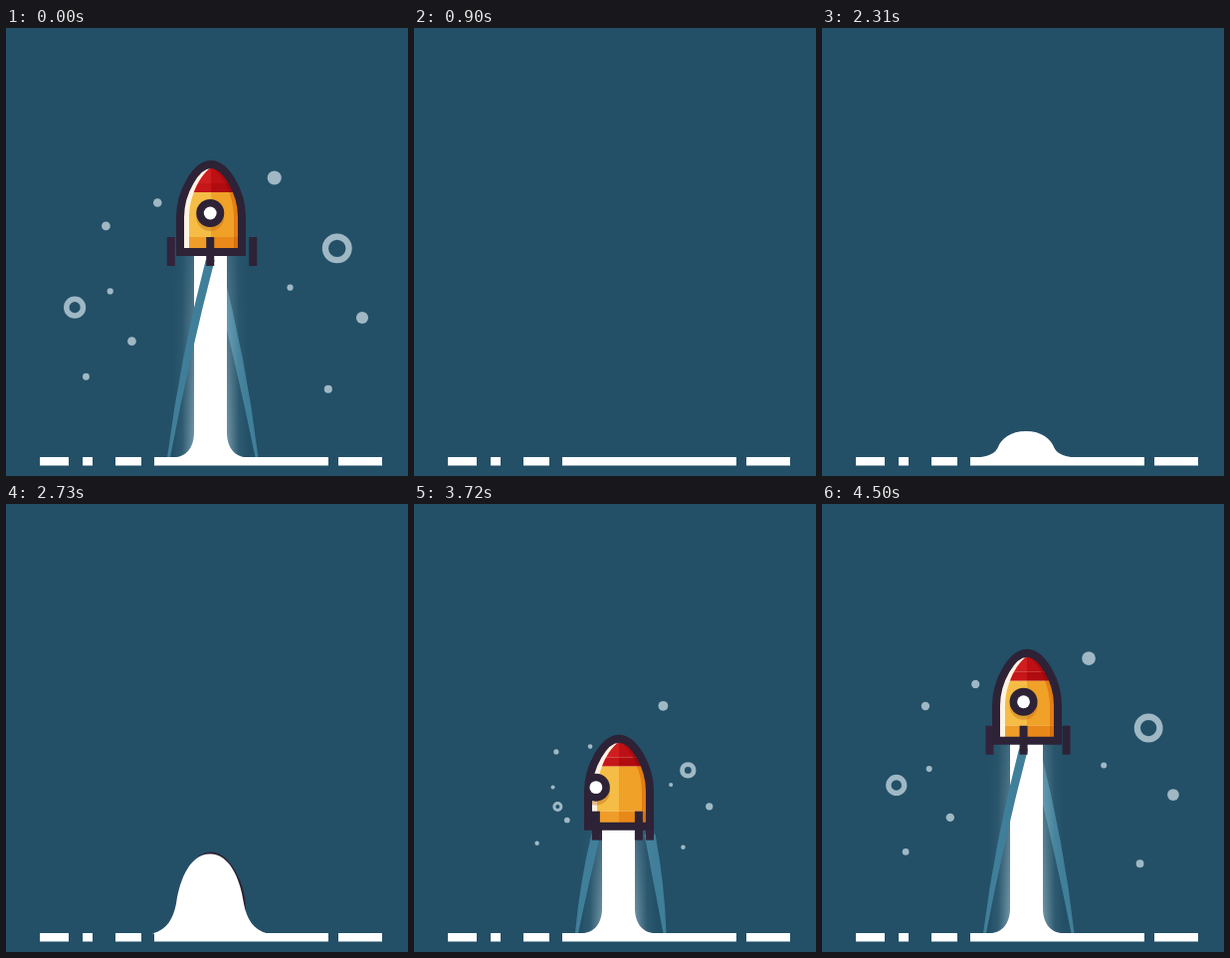
Write an HTML page with a canvas that moves like this. It is 404 px wide and 450 px high and loops after 4.53 s.

```html
<!DOCTYPE html>
<html>
<head>
<meta charset="utf-8">
<style>
html, body { margin: 0; width: 100%; height: 100%; overflow: hidden; background: #235067; }
canvas { display: block; }
</style>
</head>
<body>
<canvas id="stage" width="404" height="450"></canvas>
<script>
const ctx = document.getElementById('stage').getContext('2d');
const LOOP = 4530, STEP = 30, WRAP = 1200;
const CX = 206, GROUND = 431, BLAST_Y = 323;
const LAUNCH = 2730, RELEASE = .6;
const BG = '#235067', INK = '#2d2236', INK_BACK = '#33233a';
const TRAIL = '#407f99', DUST = '#9fb8c4';

const clamp = (v, a = 0, b = 1) => Math.min(b, Math.max(a, v));
const mix = (a, b, k) => a + (b - a) * k;
const softplus = (x, w) => w * Math.log(1 + Math.exp(x / w));

// Flight progress: slow motion that speeds up around 4300 ms.
const progress = t => .00012 * (t - 3150) + .00184 * softplus(t - 4300, 90);
const speedUp = (p, k) => mix(p, p ** 3, k);

const rocketTop = (t, p) =>
  242 - 236 * speedUp(p, .363) + 200 / (1 + Math.exp((t - LAUNCH) / 30));
const spin = p => -.62 + 1.15 * speedUp(p, .255);

// Where each speck flies to, its size there, and how far out it already is
// in slow motion; rings also have a hole.
const dust = [
  [281, 120, 8.3, .55],
  [77.5, 172, 5.3, .43],
  [139.5, 140.5, 5.3, .36],
  [85, 253, 3.7, .5],
  [33, 269.5, 14, .25, .57],
  [111, 313, 5.2, .5],
  [56, 355.5, 4.1, .5],
  [362.5, 197.5, 18.5, .37, .7],
  [301, 248.5, 3.7, .5],
  [391, 284, 7.4, .43],
  [351.5, 372, 5, .37]
];

const body = new Path2D('M-31 92V57C-31 32-15 4 0 4C15 4 31 32 31 57V92Z');
const shade = new Path2D('M-60-20H60V120H-60Z');
shade.addPath(body, new DOMMatrix().translate(-8, 0));

function disc(x, y, r, color) {
  ctx.fillStyle = color;
  ctx.beginPath();
  ctx.arc(x, y, r, 0, 7);
  ctx.fill();
}

function box(x, y, w, h, color) {
  ctx.fillStyle = color;
  ctx.fillRect(x, y, w, h);
}

function drawDust(t, p) {
  if (t < 2850 || p > 1.2) return;
  const burst = 1 - (1 - clamp((t - 2820) / 270)) ** 3;
  ctx.globalAlpha = clamp((1.2 - p) / .2);
  for (const [x, y, r, near, hole] of dust) {
    const k = burst * Math.sqrt(mix(near * near, 1, p));
    ctx.fillStyle = DUST;
    ctx.beginPath();
    const px = mix(CX, x, k), py = mix(BLAST_Y, y, k);
    ctx.arc(px, py, r * k, 0, 7);
    if (hole) ctx.arc(px, py, r * k * mix(.4, hole, clamp(p)), 0, 7);
    ctx.fill('evenodd');
  }
  ctx.globalAlpha = 1;
}

// Tapered ribbon that hangs straight down at its lower end.
function drawTrail(x, y, endX, endY, width) {
  if (endY - y < 5) return;
  const bendX = mix(x, endX, .62), bendY = (y + endY) / 2, w = width / 2;
  ctx.fillStyle = TRAIL;
  ctx.beginPath();
  ctx.moveTo(x - w, y);
  ctx.quadraticCurveTo(bendX - w, bendY, endX - 1.5, endY);
  ctx.lineTo(endX + 1.5, endY);
  ctx.quadraticCurveTo(bendX + w, bendY, x + w, y);
  ctx.fill();
}

function drawGlow(top, end, loose) {
  const g = ctx.createLinearGradient(168, 0, 243, 0);
  [[0, 0], [.12, .08], [.28, .5], [.72, .5], [.88, .08], [1, 0]]
    .forEach(([k, a]) => g.addColorStop(k, `rgba(200,225,236,${a})`));
  ctx.fillStyle = g;
  for (let y = Math.round(top); y < end; y += 4) {
    const k = (y - top) / (end - top);
    ctx.globalAlpha = mix(.35, 1, k) * (1 - loose * k ** 8);
    ctx.fillRect(168, y, 75, 4);
  }
  ctx.globalAlpha = 1;
}

function drawColumn(top, end, loose) {
  const g = ctx.createLinearGradient(0, end - 38 * loose - .01, 0, end);
  g.addColorStop(0, '#fff');
  g.addColorStop(.35, `rgba(255,255,255,${1 - .1 * loose})`);
  g.addColorStop(1, `rgba(255,255,255,${1 - loose})`);
  ctx.fillStyle = g;
  ctx.beginPath();
  ctx.roundRect(189, top, 33, end - top, [0, 0, 16 * loose, 16 * loose]);
  ctx.fill();
}

function drawFlare(size) {
  const w = 20 * size, h = 25 * size;
  ctx.fillStyle = '#fff';
  for (const [x, dir] of [[189, -1], [222, 1]]) {
    ctx.beginPath();
    ctx.moveTo(x - dir, GROUND - h);
    ctx.lineTo(x, GROUND - h);
    ctx.bezierCurveTo(x, GROUND - h * .4, x + dir * w * .4, GROUND, x + dir * w, GROUND);
    ctx.lineTo(x - dir, GROUND);
    ctx.fill();
  }
}

function drawBody(windowX) {
  ctx.fillStyle = '#fff3e2';
  ctx.fill(body);
  ctx.save();
  ctx.clip(body);
  ctx.save();
  ctx.translate(9, 0);
  ctx.clip(body);
  ctx.translate(-9, 0);
  const bands = [
    [0, 23, '#d01d20', '#bd1014', '#a80c10'],
    [23, 9, '#c5161a', '#b00c10', '#9c0a0e'],
    [32, 45, '#f5bd45', '#f0a128', '#e37d14'],
    [77, 20, '#ef9d28', '#e88818', '#d86f10']
  ];
  for (const [y, h, left, mid, right] of bands) {
    box(-40, y, 40, h, left);
    box(0, y, 40, h, mid);
    ctx.save();
    ctx.beginPath();
    ctx.rect(-40, y, 80, h);
    ctx.clip();
    ctx.fillStyle = right;
    ctx.fill(shade, 'evenodd');
    ctx.restore();
  }
  ctx.restore();
  if (windowX !== null) disc(windowX, 57, 14, 'rgba(190,105,20,.4)');
  ctx.restore();

  ctx.strokeStyle = INK;
  ctx.lineWidth = 8;
  ctx.stroke(body);

  if (windowX !== null) {
    ctx.save();
    ctx.clip(body);
    disc(windowX, 53, 14, INK);
    disc(windowX, 53, 6.4, '#fff');
    ctx.restore();
  }
}

// Four fins a quarter turn apart, sliding right in front and left behind.
function finPlaces(u) {
  return [0, 1, 2, 3].map(k => {
    const v = (((u + k + 1) % 4) + 4) % 4 - 1;
    if (v <= 1) return { front: true, x: 1 + v * 43 };
    const w = 2 - v;
    return { front: false, x: 1 + w * 43 + 24 * Math.max(0, w) * (1 - w) };
  });
}

function drawFlight(t, p) {
  const top = rocketTop(t, p), base = top + 92;
  const fins = finPlaces(spin(p));
  const d = Math.max(0, (p - RELEASE) / (1 - RELEASE));
  const end = GROUND - 45 * d ** 3, tail = GROUND - 134 * d ** 2;
  const shift = 27 * clamp(d), loose = clamp(d * 2);
  const thrust = base < end;
  const trail = (fin, endX, width) =>
    drawTrail(CX + fin.x, top + 100, endX, tail, width);
  const drawFins = (front, color) => fins.filter(f => f.front === front)
    .forEach(f => box(CX + f.x - 4, top + 77, 8, 29, color));

  ctx.save();
  ctx.beginPath();
  ctx.rect(0, 0, 404, GROUND);
  ctx.clip();
  trail(fins[2], 252 - shift, 11);
  if (thrust) drawGlow(base, end, loose);
  drawFins(false, INK_BACK);
  if (thrust) {
    drawColumn(base, end, loose);
    drawFlare(1 - loose);
  }
  trail(fins[0], 163.5 + shift, 9);
  ctx.save();
  ctx.translate(CX, top);
  drawBody(fins[0].front ? fins[0].x : null);
  ctx.restore();
  drawFins(true, INK);
  ctx.restore();
}

// Smoke swells before the launch and sinks once the rocket is through.
function drawDome(t) {
  const k = clamp((t - 1740) / (LAUNCH - 1740));
  const sink = 1 - clamp((t - LAUNCH) / 120) ** 2;
  if (k * sink <= 0) return;
  ctx.save();
  ctx.translate(205, GROUND + .5);
  ctx.scale(Math.cbrt(k) * mix(.6, 1, sink), k * k * sink);
  ctx.fillStyle = '#fff';
  ctx.beginPath();
  ctx.moveTo(-58, 0);
  ctx.bezierCurveTo(-43, -4, -37, -15, -34, -30);
  ctx.bezierCurveTo(-30, -57, -19, -80, 0, -80);
  ctx.bezierCurveTo(19, -80, 30, -57, 34, -30);
  ctx.bezierCurveTo(37, -15, 43, -4, 58, 0);
  ctx.fill();
  ctx.restore();
}

function drawGround() {
  for (const [a, b] of [[34, 63], [77, 87], [110, 136], [149, 324], [334, 378]]) {
    box(a, GROUND, b - a, 8.5, '#fff');
  }
}

function render(ms) {
  const step = Math.floor((ms % LOOP) / STEP) * STEP;
  const t = step < WRAP ? step + LOOP : step;
  const p = progress(t);
  box(0, 0, 404, 450, BG);
  drawDust(t, p);
  if (t > LAUNCH - 60 && t < 5000) drawFlight(t, p);
  drawDome(t);
  drawGround();
}

const start = performance.now();
function tick() {
  render(performance.now() - start);
  requestAnimationFrame(tick);
}
tick();
</script>
</body>
</html>
```
